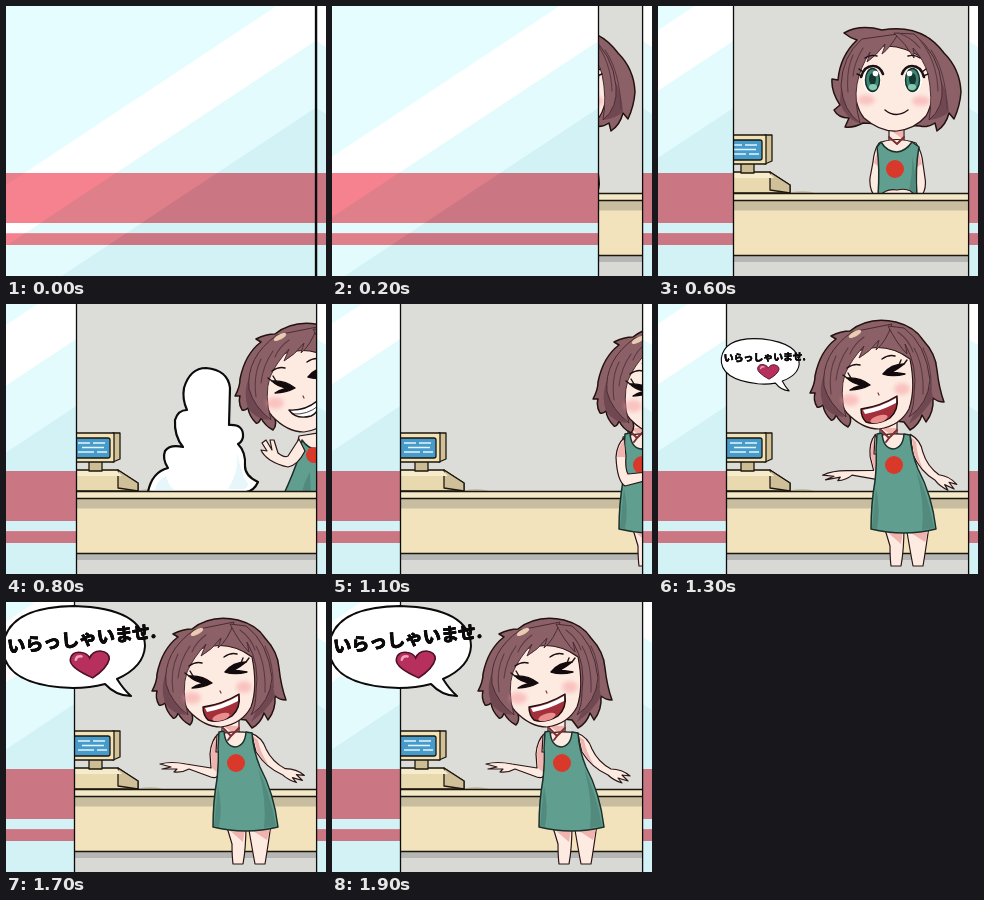
These frames come from a looping animation (320 by 270 pixels, 2600 ms). An HTML page:

```html
<!DOCTYPE html>
<html lang="ja">
<head>
<meta charset="utf-8">
<title>Welcome</title>
<style>
html, body { margin: 0; width: 100%; height: 100%; overflow: hidden; background: #dcddd8; }
svg { display: block; width: 100vw; height: 100vh; }
.hair { fill: #8b6067; stroke: #24120f; stroke-width: 1.5; stroke-linejoin: round; }
.fringe { stroke: #4a2c33; stroke-width: 1; }
.lock { fill: none; stroke: #5c3a43; stroke-width: 1.1; stroke-linecap: round; }
.shade { fill: #6f4852; }
.skin { fill: #fdebe2; stroke: #2c1618; stroke-width: 1.2; stroke-linejoin: round; }
.warm { fill: #f1b3ae; }
.dress { fill: #609f90; stroke: #1c302b; stroke-width: 1.5; stroke-linejoin: round; }
.fold { fill: #528b7d; }
.ink { fill: none; stroke: #1c1012; stroke-width: 1.4; stroke-linecap: round; stroke-linejoin: round; }
.lid { fill: #120a0c; stroke: #120a0c; stroke-width: 1.4; stroke-linejoin: round; }
.tie { fill: none; stroke: #7c2f33; stroke-width: 2; stroke-linecap: round; stroke-linejoin: round; }
.blush { fill: #f59a9f; opacity: .5; }
.badge { fill: #d8392a; }
.box { stroke: #1c170e; stroke-width: 1.3; stroke-linejoin: round; }
text { font: 900 18px "Noto Sans CJK JP", "Noto Sans CJK", sans-serif; fill: #0c0a0a; stroke-linejoin: round; }
</style>
</head>
<body>
<svg viewBox="0 0 320 270" preserveAspectRatio="none">
  <defs>
    <clipPath id="room"><rect x="60" width="250.5" height="270"/></clipPath>
    <clipPath id="stripes"><path d="M-10 167H340V217H-10ZM-10 227.5H340V239H-10Z"/></clipPath>
    <clipPath id="side"><rect x="311" width="9" height="270"/></clipPath>
    <filter id="soft" x="-50%" y="-50%" width="200%" height="200%"><feGaussianBlur stdDeviation="2.2"/></filter>
    <g id="pane"></g>

    <g id="head">
      <path class="hair" d="M151 72Q156 47 172 35L167 32Q177 27 186 27Q205 12 232 18Q251 23 259 36Q272 50 273 66Q275 84 280 98Q274 98 269 94Q270 108 262 118L258 111Q255 121 246 126L240 118L186 112Q188 119 184 123Q176 119 172 111Q170 117 167 116Q160 109 159 101Q156 104 153 103Q149 96 151 89L146 89Q151 80 151 72Z"/>
      <path class="shade" d="M159 101Q153 84 162 66Q162 90 180 113Q166 112 159 101ZM269 94Q262 108 245 120Q256 98 258 74Q268 82 269 94Z"/>
      <path class="skin" d="M174 75Q174 98 183 109Q198 125 215 125Q236 122 245 105Q252 85 246 55Q215 32 178 55Z"/>
      <path class="hair fringe" d="M228 20Q222 38 212 46Q214 40 215 36Q206 48 195 54Q198 47 200 42Q187 56 181 70Q175 88 182 113Q165 100 160 82Q157 50 188 28Z"/>
      <path class="hair fringe" d="M224 22Q233 40 243 50Q242 44 241 40Q254 62 250 90Q250 104 245 113Q264 100 266 76Q262 40 240 24Z"/>
      <path class="lock" d="M172 52Q164 68 167 90M184 44Q174 58 172 76M200 33Q190 40 186 50M250 44Q260 62 259 90M259 44Q268 62 267 86M234 28Q245 36 249 48"/>
      <ellipse cx="191" cy="30" rx="7" ry="2.500" fill="#e9cdb2" transform="rotate(-28 191 30)"/>
      <ellipse class="blush" cx="186" cy="96" rx="9" ry="6" filter="url(#soft)"/>
      <ellipse class="blush" cx="238" cy="85" rx="8" ry="6" filter="url(#soft)"/>
      <path class="lid" d="M183 74Q196 73 206 81Q197 86 186 86Q191 83 198 81Q189 80 183 74ZM240 60Q227 60 219 70Q229 73 241 70Q234 69 228 68Q234 65 240 60Z"/>
      <path class="ink" d="M183 74L179 71M187 74L184 69M240 60L243 56M235 61L237 56M183 64Q190 59 196 61M218 55Q225 50 231 52"/>
      <path class="tie" style="stroke-width:1.2" d="M214 89L215 91"/>
    </g>
    <g id="grin">
      <path class="ink" style="fill:#fff" d="M200 103Q216 104 228 94Q232 104 222 109Q207 113 200 103Z"/>
      <path class="ink" style="stroke-width:.8" d="M204 107Q219 108 229 99"/>
    </g>
    <g id="gown">
      <path class="skin" d="M220 222L226 242Q226 254 227 262H237Q240 246 240 222ZM242 222Q246 246 249 262H259Q262 244 265 222Z"/>
      <path class="warm" d="M222 227H239L237 240ZM244 227H264L261 238Z"/>
      <path class="skin" d="M216 118V138H233V118Z"/>
      <path class="warm" d="M217 124H232V134Z"/>
      <path class="skin" d="M211 133Q225 128 246 131L249 150H210Z"/>
      <path class="dress" d="M213 130L218 129Q219 144 229 145Q239 144 240 130L246 131Q247 148 254 165Q268 191 272 225Q240 233 207 225Q207 200 211 177Q213 158 212 146Z"/>
      <path class="fold" d="M252 166Q264 190 270 224L258 226Q261 198 252 166ZM212 184Q217 205 213 225L208 224Z"/>
      <circle class="badge" cx="230" cy="161" r="9"/>
      <path class="tie" d="M217 126L225 134L233 126M225 134L222 138"/>
    </g>
  </defs>

  <g clip-path="url(#room)">
    <rect width="320" height="270" fill="#dcddd8"/>
    <g id="register">
      <path d="M130 187Q145 183 157 187Z" fill="#c5bda4"/>
      <path class="box" fill="#e9d9ae" d="M60 166H112L132 179V187H60Z"/>
      <path class="box" fill="#cfc09a" d="M112 166L132 179V187L112 184Z"/>
      <path fill="#f6ebcb" d="M60 167H111L116 172H60Z"/>
      <path class="box" fill="#cdbd94" d="M83 157H96V167H83Z"/>
      <path class="box" fill="#d2c196" d="M107 129H114V155L107 158Z"/>
      <path class="box" fill="#f1e2b8" d="M60 129H108V158H60Z"/>
      <rect class="box" fill="#469bcb" x="60" y="134" width="44" height="20" rx="2"/>
      <path d="M72 139H84M87 139H99M76 143.500H98M72 148H88M91 148H101" stroke="#e4f5fb" stroke-width="1.500"/>
    </g>

    <g id="greet">
      <path class="hair" d="M186 27Q202 18 224 24Q264 17 286 47Q302 63 303 86Q302 100 296 113L291 107Q288 119 279 125L277 117Q270 122 262 120L205 117Q196 122 187 121L191 112Q180 112 176 104L182 99Q173 86 174 73L180 74Q182 50 199 34Q192 32 186 27Z"/>
      <path class="shade" d="M182 97Q183 70 188 65Q188 98 200 117Q187 111 182 97ZM291 106Q284 112 272 114Q283 92 281 72Q290 85 291 106Z"/>
      <path class="skin" d="M231 118V140H246V118Z"/>
      <path class="warm" d="M232 124H245V133Z"/>
      <path class="skin" d="M221 137Q238 130 258 137Q264 146 265 158L267 172Q269 184 262 192H218Q211 184 212 172L215 156Q216 144 221 137Z"/>
      <path class="warm" d="M221 139L216 157L220 160ZM259 140L264 158L259 161Z"/>
      <path class="dress" d="M223 136Q229 146 239 146Q248 145 254 136L261 141Q257 162 259 190H220Q222 162 219 141Z"/>
      <path class="fold" d="M254 150Q258 168 258 188H250Q255 168 254 150Z"/>
      <path class="skin" d="M222 190Q228 182 239 184Q252 181 257 190Z"/>
      <circle class="badge" cx="237" cy="163" r="9"/>
      <path class="tie" d="M231 131L239 138L246 131"/>
      <path class="skin" d="M196 70Q196 100 206 112Q222 126 239 125Q257 123 268 110Q277 95 275 60Q240 30 205 45Z"/>
      <path class="hair fringe" d="M240 28Q232 42 224 48Q227 41 227 38Q218 50 209 56Q211 50 212 46Q202 62 199 78Q196 96 202 117Q185 105 183 80Q184 50 204 33Z"/>
      <path class="hair fringe" d="M236 27Q248 38 256 52Q256 46 255 42Q266 54 270 68Q275 92 271 114Q286 102 284 80Q281 48 256 28Z"/>
      <path class="lock" d="M195 49Q188 65 190 86M205 42Q196 57 195 70M273 44Q288 66 289 103M262 34Q279 55 280 85M240 27Q253 31 262 42"/>
      <ellipse class="blush" cx="208" cy="94" rx="9" ry="5" filter="url(#soft)"/>
      <ellipse class="blush" cx="263" cy="95" rx="9" ry="5" filter="url(#soft)"/>
      <g id="eye">
        <ellipse cx="214" cy="74" rx="9" ry="13" fill="#fff"/>
        <ellipse cx="214.500" cy="74" rx="7" ry="11.500" fill="#3d8573" stroke="#16302a" stroke-width="1.500"/>
        <ellipse cx="214.500" cy="73" rx="3.500" ry="6" fill="#16372f"/>
        <ellipse cx="215" cy="81" rx="4" ry="3" fill="#86c9ae"/>
        <circle cx="217.500" cy="67.500" r="2.800" fill="#fff"/>
        <path class="ink" style="stroke-width:2.600" d="M203 71Q206 60 215 60Q222 60 225 68"/>
        <path class="ink" d="M204 70L199 68M205 66L201 63M207 52Q212 48 219 50"/>
      </g>
      <use href="#eye" transform="matrix(-1 0 0 1 469 0)"/>
      <path class="ink" d="M227 104Q238 113 250 104"/>
    </g>

    <g id="puff">
      <path d="M142 188Q146 168 162 164Q156 155 159 147Q164 140 177 143Q168 132 169 116Q172 106 181 106Q176 95 178 84Q184 64 200 64Q222 66 224 84L223 121Q238 120 237 133Q236 138 232 140Q240 148 239 162Q239 172 252 178Q248 187 240 188Z" fill="#fff" stroke="#0b0b0b" stroke-width="2.200" stroke-linejoin="round"/>
      <path d="M231 150Q233 168 222 185H238Q246 181 238 175ZM149 186Q151 176 160 172Q162 181 168 186Z" fill="#e6f6fa"/>
    </g>

    <g id="dash">
      <path class="skin" d="M293 132L318 128V155H288Z"/>
      <path class="dress" d="M296 136Q303 146 312 145L330 138L333 192H277Q288 168 293 152Z"/>
      <path class="fold" d="M304 168Q297 180 296 190H305Z"/>
      <circle class="badge" cx="308" cy="151" r="8"/>
      <path class="skin" d="M293 135L299 147Q292 161 282 163Q272 161 264 156Q257 151 255 146L261 147L256 139L260 136L266 146L264 136L268 136L272 149Q278 154 282 152Z"/>
      <use href="#head" x="83" y="3"/>
      <use href="#grin" x="83" y="3"/>
    </g>

    <g id="counter">
      <rect x="60" y="187" width="252" height="8" fill="#f3e8c8"/>
      <rect x="60" y="194" width="252" height="56" fill="#f3e3bd"/>
      <rect x="60" y="194" width="252" height="10.500" fill="#c8bd9f"/>
      <rect x="60" y="249" width="252" height="21" fill="#d8d9d5"/>
      <rect x="60" y="249" width="252" height="7" fill="#b6b7b4"/>
      <path d="M60 187.500H312M60 194.500H312M60 249.500H312" stroke="#1c170e" stroke-width="1.500"/>
    </g>

    <g id="enter">
      <g id="enterBody">
        <use href="#gown"/>
        <path class="skin" d="M212 134Q205 140 204 153Q205 177 213 182L236 176Q240 172 236 168L216 170Q213 165 214 152Z"/>
        <path class="warm" d="M212 136Q206 142 205 153L213 153Z"/>
      </g>
      <g id="enterHead"><use href="#head"/><use href="#grin"/></g>
    </g>

    <g id="welcome">
      <g id="armL">
        <path class="skin" d="M213 131Q205 138 204 152L205 166L180 162Q165 159 154 162L165 165L156 167L171 167L168 170Q176 171 183 167L202 174Q211 178 213 172Q215 162 214 148Z"/>
        <path class="warm" d="M212 134Q206 140 205 152L206 166L213 172Q210 152 212 134Z"/>
      </g>
      <g id="armR">
        <path class="skin" d="M245 131Q256 135 260 147Q266 160 279 167Q290 167 298 174L290 173L296 179L286 176L290 181Q281 178 276 173Q260 166 250 150Z"/>
        <path class="warm" d="M247 134L251 149Q256 158 262 163Q254 150 252 138Z"/>
      </g>
      <use href="#gown"/>
      <use href="#head"/>
      <path class="ink" style="fill:#a4303b" d="M197 105Q217 102 233 92Q235 106 226 114Q213 122 202 118Q197 113 197 105Z"/>
      <path d="M199 106Q217 103 232 94L232 99Q217 107 201 110Z" fill="#fff"/>
      <ellipse cx="215" cy="115" rx="9" ry="3.500" fill="#ea8d8d" transform="rotate(-18 215 115)"/>
    </g>
  </g>

  <g id="door">
    <use href="#pane"/>
    <path d="M310.500 0V270" stroke="#0c0c0c" stroke-width="1.300"/>
  </g>
  <g clip-path="url(#side)"><use href="#pane" transform="matrix(-1 0 0 1 621 0)"/></g>
  <path d="M310.600 0V270" stroke="#0c0c0c" stroke-width="1.300"/>

  <g id="bubble">
    <path d="M111 77Q118 88 125 94Q110 94 99 82Q84 86 67 86Q-3 84 -3 45Q0 5 68 4Q138 6 139 44Q138 65 111 77Z" fill="#fff" stroke="#0c0a0a" stroke-width="2" stroke-linejoin="round"/>
    <g transform="translate(84 62) rotate(-3)">
      <path d="M2 14Q-20 3 -19.500 -5Q-18 -14 -8 -12Q-2 -11 0 -6Q3 -13 11 -12.500Q20 -11 19.500 -4Q17 5 2 14Z" fill="#b62f5d" stroke="#4d1027" stroke-width="1.600"/>
      <path d="M-14 -5Q-13 -9 -8 -8" fill="none" stroke="#f0a5bd" stroke-width="2.500" stroke-linecap="round"/>
    </g>
    <g transform="rotate(-6 3 51)">
      <use href="#words" stroke="#fff" stroke-width="3.500"/>
      <text id="words" x="2" y="51" stroke="#0c0a0a" stroke-width=".7">いらっしゃいませ.</text>
    </g>
  </g>
</svg>
<script>
const $ = id => document.getElementById(id);
const move = (id, x, y = 0) => $(id).setAttribute('transform', `translate(${x} ${y})`);
const turn = (id, a, x, y) => $(id).setAttribute('transform', `rotate(${a} ${x} ${y})`);
const grow = (id, k, x, y, a = 0) => $(id).setAttribute('transform',
  `translate(${x} ${y}) rotate(${a}) scale(${k}) translate(${-x} ${-y})`);
const show = (id, on) => { $(id).style.display = on ? '' : 'none'; };

// Parallel reflections across the glass; each colour paints below its edge.
const edges = [-999, 180, 240.5, 307.5];
const glass = colors => colors.map((c, i) =>
  `<path fill="${c}" d="M-10 ${edges[i] + 6.6}L311 ${edges[i] - 206}V270H-10Z"/>`).join('');
$('pane').innerHTML = glass(['#e6fdff', '#fff', '#e4fbfe', '#d3f2f6']) +
  `<g clip-path="url(#stripes)">${glass(['#e8808b', '#f5828e', '#de7f89', '#cb7783'])}</g>`;

const STEP = 100, LOOP = 2600, LAST = 19;

// Linear track through [step, value] pairs.
function track(keys, n) {
  let i = 1;
  while (i < keys.length - 1 && keys[i][0] < n) i++;
  const [a, u] = keys[i - 1], [b, v] = keys[i];
  return u + (v - u) * Math.min(1, Math.max(0, (n - a) / (b - a)));
}

const doorX = [[0, 309], [1, 301], [2, 266], [3, 178], [4, 101], [5, 82], [6, 75], [8, 70], [11, 68]];
const dashX = [[7, -32], [8, 0], [9, 58]];
const puffSize = [[7, .5], [8, 1], [9, .7]];
const headX = [[10, 155], [11, 115], [12, 32]];
const bodyX = [[10, 125], [11, 80], [12, 20]];
const popSize = [[13, .55], [14, .86], [15, .96], [17, 1]];
const popTilt = [[13, 5], [15, 1.5], [17, 0]];

function draw(time) {
  const n = Math.min(LAST, Math.floor(time % LOOP / STEP));
  move('door', track(doorX, n) - 310);

  show('greet', n < 7);
  show('dash', n >= 7 && n < 10);
  show('puff', n >= 7 && n < 10);
  show('enter', n >= 10 && n < 13);
  show('welcome', n >= 13);
  show('bubble', n >= 13);

  move('dash', track(dashX, n));
  grow('puff', track(puffSize, n), 195, 187);
  move('enterBody', track(bodyX, n));
  move('enterHead', track(headX, n), 6);

  move('welcome', track([[13, 6], [15, 0]], n));
  const lift = track([[13, 10], [15, 0]], n);
  turn('armL', -lift, 209, 140);
  turn('armR', lift + track([[15, -2], [18, 0]], n), 250, 140);
  grow('bubble', track(popSize, n), 140, 80, track(popTilt, n));
}

let start;
function tick(now) {
  start ??= now;
  draw(now - start);
  requestAnimationFrame(tick);
}
draw(0);
requestAnimationFrame(tick);
</script>
</body>
</html>
```
